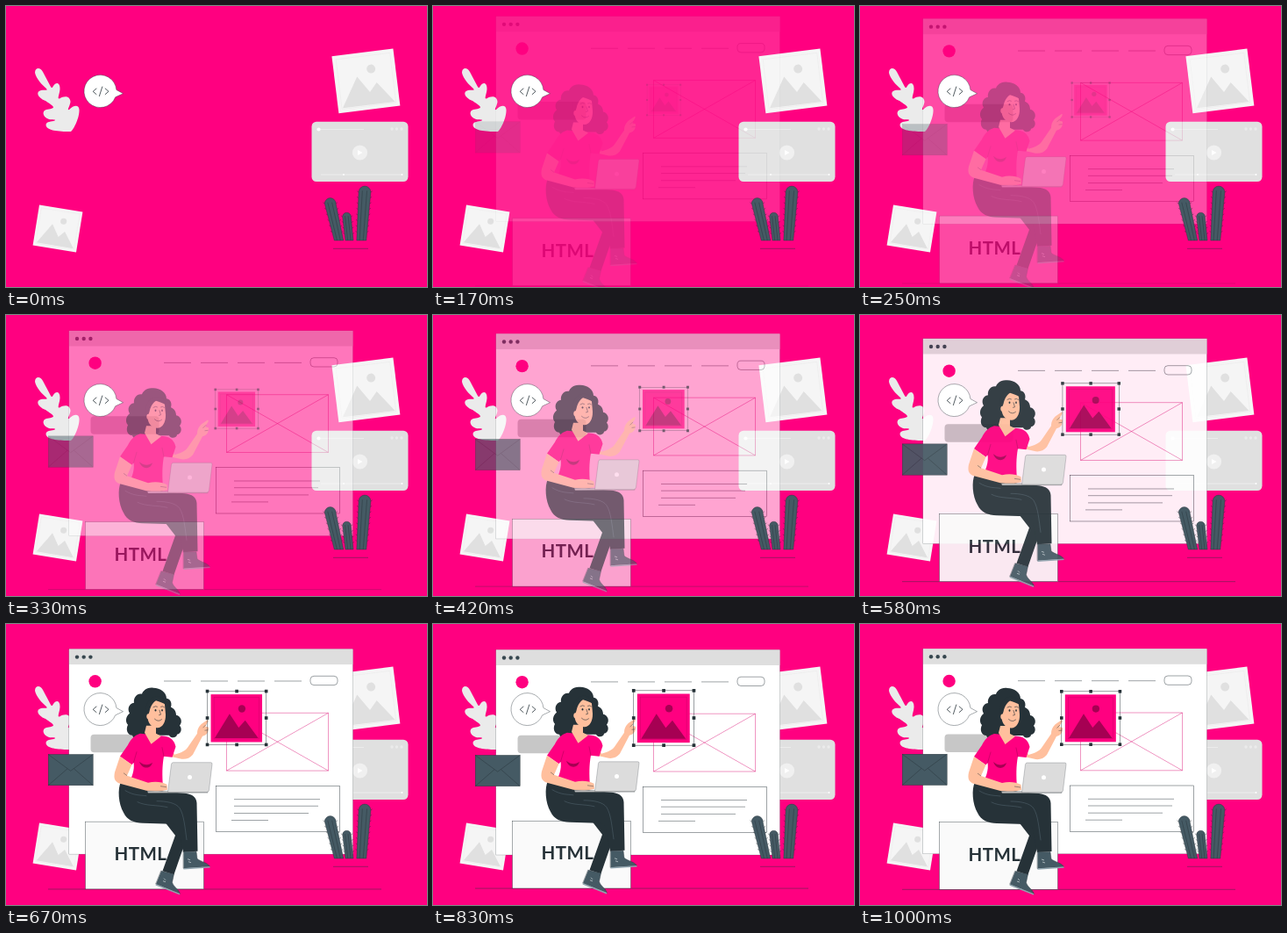
Write an HTML page that moves like this. It is 480 px wide and 320 px high and loops after 1.04 s.

```html
<!DOCTYPE html>
<html lang="en">
<head>
<meta charset="utf-8">
<title>Web design scene</title>
<style>
  html, body { margin: 0; width: 100%; height: 100%; overflow: hidden; background: #ff0080; }
  svg { display: block; width: 100vw; height: 100vh; }
  .line { fill: none; stroke: #263238; stroke-width: .45; }
  .outlined { stroke: #263238; stroke-width: .4; }
  .round { stroke-linecap: round; stroke-linejoin: round; }
  .dark { fill: #263238; }
  .slate { fill: #455a64; }
  .pink { fill: #ff0080; }
  .skin { fill: #ffbf9d; }
</style>
</head>
<body>
<svg viewBox="0 0 480 320" xmlns="http://www.w3.org/2000/svg">
  <rect class="pink" width="480" height="320"/>

  <g id="cards"></g>

  <g id="video">
    <rect x="348.5" y="131.7" width="110" height="68.3" rx="5.5" fill="#e0e0e0"/>
    <circle cx="403.5" cy="167" r="8.6" fill="#f0f0f0"/>
    <path d="M401 164l5.5 3-5.5 3z" fill="#fff"/>
    <path d="M357 140.5H408M359 192H452" stroke="#f2f2f2" stroke-width=".7"/>
    <g fill="#fff"><circle cx="356.5" cy="140.5" r="2.1"/><circle cx="385" cy="192" r=".9"/><circle cx="451.5" cy="192" r="1"/></g>
    <g fill="#ebebeb"><circle cx="440" cy="140" r="1.7"/><circle cx="445.5" cy="140" r="1.7"/><circle cx="451" cy="140" r="1.7"/></g>
  </g>

  <path id="leaf" fill="#ebebeb" d="M33 76C33 70 39 69 42 75L51 92C52 94 53 93 54 91C57 86 62 87 61.500 95C61 101 58 106 61 105.500C66 102 73 102 73.500 109C73 114 69 119 72 118C77 113 83 112 83.500 118C84 127 77 141 74 143C65 143 46 143 45.500 135.500C46 131 52 132 55.500 130.500C58 129 53 130 49 129C41 126 41 119 46 118C50 117 54 117 54 115C53 113 48 110 45 108C35 104 34 97 40 96C45 95 48 97 46 94C41 90 34 82 33 76Z"/>

  <g id="window">
    <rect class="outlined" x="71.800" y="28.200" width="323.700" height="233.600" fill="#fff" stroke-opacity=".5"/>
    <rect x="72" y="28.400" width="323.300" height="17.400" fill="#dedede"/>
    <g fill="#37474f"><circle cx="81" cy="37.300" r="2.200"/><circle cx="88.700" cy="37.300" r="2.200"/><circle cx="96.400" cy="37.300" r="2.200"/></g>
    <circle class="pink" cx="101.600" cy="65" r="7.200"/>
    <path class="line" d="M180 64.700h31m11 0h31m11 0h31m11 0h31"/>
    <rect class="line" x="347" y="59" width="31" height="10.300" rx="4"/>
    <rect x="96.500" y="125.500" width="78" height="20.500" rx="4" fill="#c7c7c7"/>
    <path d="M251.500 101H367.500V166.800H251.500ZL367.500 166.800M251.500 166.800L367.500 101" fill="none" stroke="#d9006d" stroke-width=".42"/>
    <rect class="line" x="239.300" y="184" width="141.200" height="52.300"/>
    <path class="line" d="M260 199.300H358M260 207H356M260 215.200H345M257 223.200H299"/>
  </g>

  <g id="envelope">
    <rect class="slate outlined" x="48.200" y="148.200" width="51" height="35.300"/>
    <path class="line" d="M48.200 148.200L73.700 167L99.200 148.200M48.200 183.500L70 164.500M99.200 183.500L77.500 164.500"/>
  </g>

  <g id="bubble">
    <path class="outlined" fill="#fff" d="M125.900 95.500L133.500 99.700L124.700 103.800A18.500 18.500 0 1 1 125.900 95.500Z"/>
    <path class="line round" style="stroke-width:.8" d="M103 94L99.200 97.300L103 100.600M109.800 92L106.400 102.600M113.200 94L117 97.300L113.200 100.600"/>
  </g>

  <g id="cacti"></g>

  <g id="box">
    <path class="line" d="M48 302.300H428"/>
    <rect class="outlined" x="90.500" y="225.400" width="135" height="76.800" fill="#fafafa"/>
    <text class="dark" x="123.500" y="269.500" font-family="Lato, sans-serif" font-weight="700" font-size="20.500" letter-spacing=".4">HTML</text>
  </g>

  <g id="woman">
    <path class="dark" d="M168 73C160 72 156 77 155 80C148 79 145 86 146 90C140 91 138 97 141 102C136 106 136 112 139 115C136 121 139 127 144 127C146 133 154 134 158 131C164 135 170 130 171 127L186 127C188 131 195 130 195 126C200 125 201 119 198 116C202 111 199 105 194 104C194 99 191 96 188 95C190 89 186 85 183 85C183 78 176 73 168 73Z"/>
    <!-- raised arm -->
    <path class="skin" d="M186 136L192 149C199 147 204 145 207 141L218 125C218 119 221 116 223 114L229.500 109.500C231.500 109 231 111.500 228 115L227.500 117.500C231 117 232 119 230.500 121C231 124 228 127 224 128L213 149C209 154 203 155 198 153.500L187 151Z"/>
    <path class="line" d="M228 115L224.500 118.500M230.500 121L226.500 121.500"/>
    <!-- legs -->
    <path class="dark" d="M165 205L193 241L178.500 281.500L191.500 285.500L207 241L198 215Z"/>
    <path class="dark" d="M131 180C127 188 128 205 134 215C138 224 146 226.500 156 227L189 228C195 228 197 231 197.500 237L202 260L218.500 259L217.500 204C217 197 212 194 204 193L180 191L148 180Z"/>
    <path class="round" fill="none" stroke="#78909c" stroke-width=".3" d="M136 190C146 196 153 195 160 196M172 202C183 202 194 204 198 210C203 218 204 232 206 246M150 203C160 208 172 206 184 209"/>
    <g class="slate outlined round">
      <path d="M202.500 259.500L217 259.500L218 267.500C222 271 230 272 232.500 276.500L202.500 278.500Z"/>
      <path d="M177 281.500L191.500 285L189.500 294.500C191 300 197 302 198.500 307.500L171 296.500Z"/>
    </g>
    <path d="M202.500 278.300L232.500 276.300L232.500 277.800L202.500 279.800ZM171 296.300L198.500 307.300L197.700 308.600L170.500 297.800Z" fill="#90a4ae"/>
    <path stroke="#cfd8dc" stroke-width=".7" d="M207 268l3 1m-2 2l3 1M180 290l2 2m-3 1l3 1"/>
    <!-- torso -->
    <path class="pink" d="M153 125C146 127 142 132 139 138L130 151L143.500 160.500L145.500 158C147 167 143 175 141 180C150 187 166 190 179 186C178 172 178 162 180 151L189.500 152L193.500 140C192 133 188 129 181 128Z"/>
    <path class="skin" d="M158 124L165.500 137L177 128L171 125V116H160Z"/>
    <path fill="none" stroke="#a60053" stroke-width=".5" class="round" d="M145.500 158L149 146M180 151L178 141"/>
    <path fill="#a60053" d="M152 157C155 166 165 166 167 158C163 161.500 157 161.500 152 157Z"/>
    <!-- face -->
    <path class="skin" d="M162 97C164 91 167 87 171 86C176 86 180 88 181 92L182 103C182.500 112 178 119 172 118.500C166 118 161.500 113 161.500 106Z"/>
    <path class="dark" d="M161 107C157 98 160 88 167 84C174 81 182 84 182.500 92C178 90 174 88 171 87.500C167 90 164.500 95 163.500 100Z"/>
    <ellipse class="skin" cx="162.300" cy="105.500" rx="2" ry="3"/>
    <g class="dark"><ellipse cx="170.500" cy="98.500" rx=".9" ry="1.200"/><ellipse cx="178" cy="98.500" rx=".8" ry="1.200"/></g>
    <path class="line round" style="stroke-width:.6" d="M168 95Q170.500 93 172.500 94.500M176.500 94.500Q178.500 93.300 180.500 95M175 98.500L176.500 103.500L174.500 104M169.500 108.500Q173.500 112.500 177.500 109"/>
    <!-- typing arm -->
    <path class="skin" d="M130 151L143.500 160.500L138 173L162 181C170 179 178 180 183.500 183L184 189L172 191.500L160 190L130 182C124 180 122.500 176 124 169Z"/>
    <path class="line" d="M176 185L183 186M138 173L134 170"/>
    <!-- laptop -->
    <path class="outlined" fill="#bdbdbd" stroke-opacity=".5" d="M161 190.500L230 190.500L230 192.500L162 192.800Z"/>
    <path class="outlined" fill="#dcdcdc" stroke-opacity=".6" d="M190.500 158H233.500Q235.300 158 235 160L231.500 189.500Q231 191.800 229 191.800H184.500L188.500 160Q189 158 190.500 158Z"/>
    <circle cx="209.500" cy="174.800" r="2.500" fill="#fff"/>
  </g>

  <g id="selection"></g>
</svg>

<script>
const LOOP = 1040, FPS = 24, SLIDE = 19.2, LEAD = .033;
const el = id => document.getElementById(id);

// Framed landscape, 70.5 x 65.5, centred on its own origin.
const picture = (transform, paper, shade) => `
  <g transform="${transform}">
    <rect x="-35.25" y="-32.75" width="70.5" height="65.5" fill="${paper}"/>
    <rect x="-31" y="-28.5" width="62" height="57" fill="none" stroke="${shade}" stroke-width=".6" stroke-opacity=".5"/>
    <path d="M-30 27.5L-9.500 -6L3 13L12 3L30 27.500Z" fill="${shade}"/>
    <circle cx="7.400" cy="-13" r="5" fill="${shade}"/>
  </g>`;

el("cards").innerHTML =
  picture("translate(410.400 85.400) rotate(-7)", "#f5f5f5", "#e0e0e0") +
  picture("translate(59 253.500) rotate(9.200) scale(.71)", "#f5f5f5", "#e0e0e0");

// Tapered column from a rounded top down to the ground, with ribs and spines.
function cactus(topX, topY, topR, baseX, baseR) {
  const ground = 267;
  const at = (k, side) => [
    topX + (baseX - topX) * k + side * (topR + (baseR - topR) * k),
    topY + (ground - topY) * k
  ];
  const ribs = [-.4, .35].map(s => `M${at(-.03, s)}L${at(1, s)}`).join("");
  let spines = "";
  for (let y = topY; y < ground - 4; y += 6.5) {
    const k = (y - topY) / (ground - topY);
    for (const side of [-1, 1]) spines += `M${at(k, side)}l${side * 1.8} -1.2`;
  }
  return `<path class="slate outlined" d="M${at(1, -1)}L${at(0, -1)}A${topR} ${topR} 0 0 1 ${at(0, 1)}L${at(1, 1)}Z"/>
    <path class="line" d="${ribs}${spines}"/>`;
}

el("cacti").innerHTML =
  cactus(369.7, 225, 6.4, 379.500, 5.200) +
  cactus(388.500, 240, 4.800, 391.500, 4.500) +
  cactus(409, 212, 6.900, 405.300, 5.500) +
  `<path class="line" d="M373 276.300H413"/>`;

const steps = [-1, 0, 1];
const handles = steps.flatMap(i => steps.filter(j => i || j).map(j =>
  `<rect class="dark" x="${i * 33.3 - 1.8}" y="${j * 30.2 - 1.8}" width="3.600" height="3.600"/>`)).join("");
el("selection").innerHTML =
  picture("translate(-.3 .3) scale(.823)", "#ff0080", "#a60053") +
  `<rect class="line" x="-33.300" y="-30.200" width="66.600" height="60.400"/>` + handles;

const bezier = (a, b, u) => 3 * a * u * (1 - u) ** 2 + 3 * b * u * u * (1 - u) + u ** 3;

// cubic-bezier(.36, -.01, .5, 1.38)
function ease(x) {
  if (x >= 1) return 1;
  let low = 0, high = 1;
  for (let i = 0; i < 30; i++) {
    const mid = (low + high) / 2;
    if (bezier(.36, .5, mid) < x) low = mid; else high = mid;
  }
  return bezier(-.01, 1.38, low);
}

function place(id, opacity, transform) {
  el(id).setAttribute("opacity", opacity);
  el(id).setAttribute("transform", transform);
}

function draw(ms) {
  const tick = Math.floor(ms / 10) * 10 + 5;
  const step = Math.floor(tick * FPS / 1000);
  const p = step ? ease(step / FPS + LEAD) : 0;
  const opacity = Math.max(0, Math.min(1, p));
  const shift = SLIDE * (1 - p);
  for (const id of ["window", "envelope"]) place(id, opacity, `translate(0 ${-shift})`);
  for (const id of ["box", "woman"]) place(id, opacity, `translate(0 ${shift})`);
  place("selection", opacity, `translate(263.100 107) scale(${.5 + .5 * p})`);
}

const start = performance.now();
function frame() {
  draw((performance.now() - start) % LOOP);
  requestAnimationFrame(frame);
}
frame();
</script>
</body>
</html>
```
